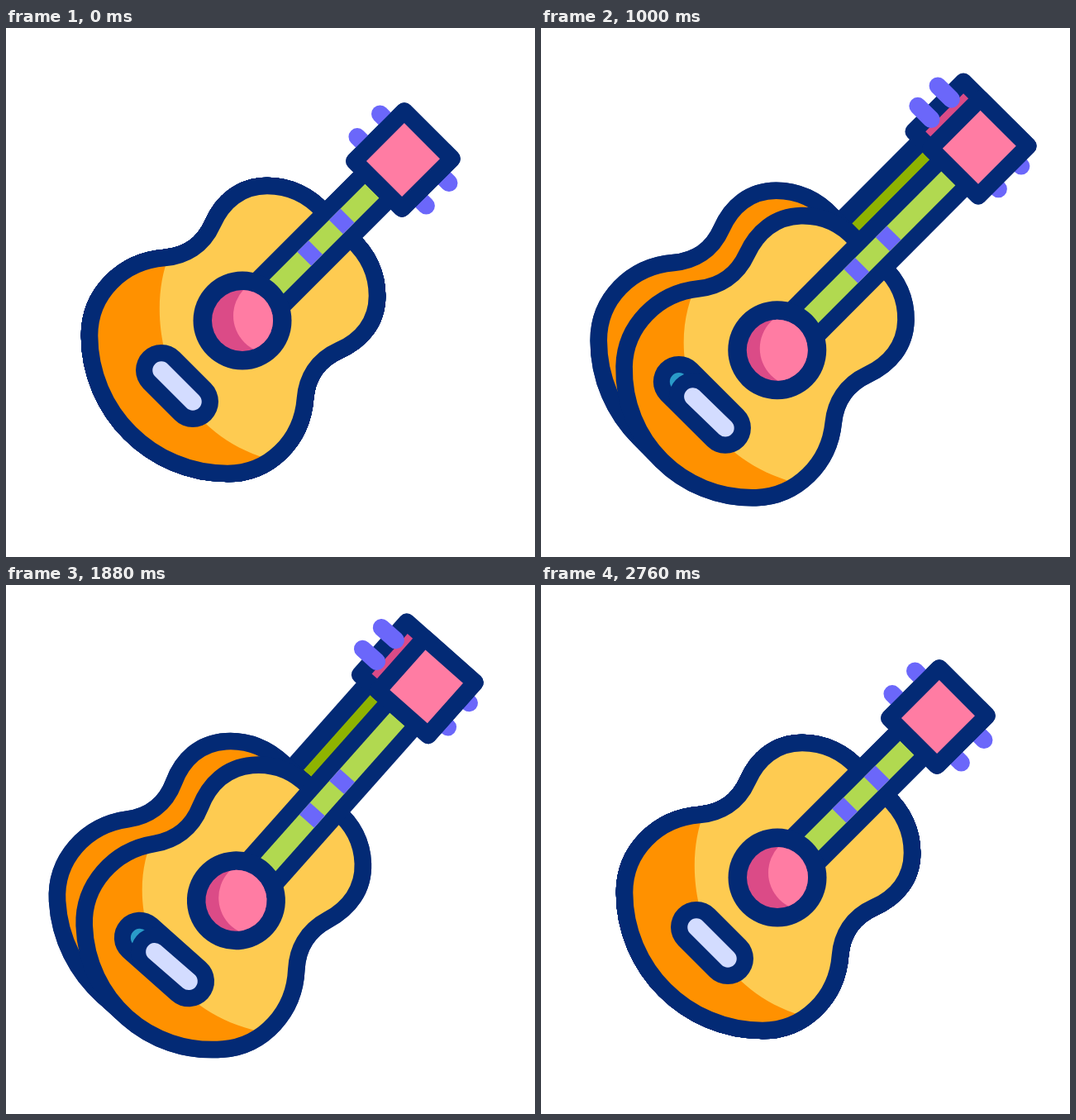
Write an HTML page with a canvas that moves like this. It is 640 by 640 pixels and loops after 3.1 s.

```html
<!DOCTYPE html>
<html lang="en">
<head>
<meta charset="utf-8">
<title>Guitar</title>
<style>
html, body { margin: 0; width: 100%; height: 100%; overflow: hidden; background: #fff; }
canvas { display: block; width: 640px; height: 640px; }
</style>
</head>
<body>
<canvas id="stage" width="640" height="640"></canvas>
<script>
const ctx = document.getElementById('stage').getContext('2d');
const LOOP = 3100, NAVY = '#032a75', PURPLE = '#6b67fa', STROKE = 20.6;
const BODY = new Path2D(`M384 222C366 202 342 191 316 191C284 191 262 210 250 237
  C238 264 216 276 192 278C140 282 101 322 101 372C101 464 176 539 268 539
  C318 539 358 500 362 448C364 424 376 402 403 390C430 378 449 356 449 324C449 298 438 274 418 256Z`);
const NOTE = new Path2D('M36 170Q67 168 67 138V86L135 66V115Q135 142 107 143');
// [time, degrees]
const SWING = [[422, 0], [647, 5], [862, -5], [1144, 5], [1364, -5], [1590, 5], [1820, -5], [2050, 5], [2280, 0]];

const clamp = x => Math.min(1, Math.max(0, x));
const mix = (a, b, k) => a + (b - a) * k;
const ramp = (t, a, b) => (1 - Math.cos(Math.PI * clamp((t - a) / (b - a)))) / 2;

function swingAt(t) {
  return SWING.slice(1).reduce((deg, [time, to], i) =>
    deg + (to - SWING[i][1]) * ramp(t, SWING[i][0], time), 0) * Math.PI / 180;
}

function box(color, x0, y0, x1, y1) {
  ctx.fillStyle = color;
  ctx.fillRect(x0, y0, x1 - x0, y1 - y0);
}

function disc(color, x, y, r) {
  ctx.fillStyle = color;
  ctx.beginPath();
  ctx.arc(x, y, r, 0, 7);
  ctx.fill();
}

function rod(color, width, x0, y0, x1, y1) {
  ctx.strokeStyle = color;
  ctx.lineWidth = width;
  ctx.beginPath();
  ctx.moveTo(x0, y0);
  ctx.lineTo(x1, y1);
  ctx.stroke();
}

function outline(path) {
  ctx.strokeStyle = NAVY;
  ctx.lineWidth = STROKE;
  ctx.stroke(path);
}

// Body moved by (dx, dy) and squeezed across the neck axis
function bodyAt(dx, dy, squeeze) {
  const path = new Path2D(), off = 507 * squeeze;
  path.addPath(BODY, new DOMMatrix([1 - squeeze, -squeeze, -squeeze, 1 - squeeze, dx + off, dy + off]));
  return path;
}

function plate(color, u, v0, v1) {
  const path = new Path2D();
  path.rect(u - 42.75, v0 - 40.75, 85.5, v1 - v0 + 81.5);
  ctx.fillStyle = color;
  ctx.fill(path);
  outline(path);
}

// Runs draw with x along the neck, origin at the sound hole
function alongNeck(depth, draw) {
  ctx.save();
  ctx.translate(286, 354 + 36 * depth);
  ctx.rotate(-Math.PI / 4);
  draw();
  ctx.restore();
}

function drawBody(depth) {
  for (let i = 0; i <= 8; i++) {
    const k = i / 8;
    const path = bodyAt(mix(-31, -1, k) * depth, mix(6, 36.5, k) * depth, 0.0235 * depth * k);
    ctx.fillStyle = NAVY;
    ctx.fill(path);
    outline(path);
  }
  const back = bodyAt(-31 * depth, 6 * depth, 0);
  ctx.fillStyle = '#ff9100';
  ctx.fill(back);
  outline(back);

  const front = bodyAt(-depth, 36.5 * depth, 0.0235 * depth);
  ctx.fill(front);
  ctx.save();
  ctx.clip(front);
  const dx = -18 * depth, dy = 29 * depth;
  ctx.fillStyle = '#fecb51';
  ctx.beginPath();
  ctx.moveTo(197 - 5 * depth, 276 + dy);
  ctx.bezierCurveTo(169 + dx, 345 + dy, 187 + dx, 489 + dy, 326 + dx / 2, 524 + dy);
  ctx.lineTo(640, 640);
  ctx.lineTo(640, 0);
  ctx.lineTo(197, 0);
  ctx.fill();
  ctx.restore();
  outline(front);
}

function drawBridge(depth) {
  const x0 = 188 - 4 * depth, y0 = 414 + 32 * depth, x1 = 226 - 3 * depth, y1 = 452 + 32 * depth;
  const bx = 188 - 21 * depth, by = 414 + 14 * depth;
  rod(NAVY, 62, bx, by, x1, y1);
  disc('#2a9bc8', bx, by, 11);
  rod(NAVY, 58, x0, y0, x1, y1);
  rod('#d3dcff', 21.5, x0, y0, x1, y1);
}

function drawHole(depth) {
  const y = 354 + 36 * depth;
  disc(NAVY, 286, y, 59.5);
  ctx.save();
  ctx.beginPath();
  ctx.arc(286, y, 37, 0, 7);
  ctx.clip();
  box('#db4b87', 240, y - 45, 330, y + 45);
  disc('#ff7ca3', 321 - 10 * depth, y - 6 + 4 * depth, 46);
  ctx.restore();
}

function drawGuitar(t) {
  const close = 1 - ramp(t, 2285, 2750);
  const depth = ramp(t, 10, 400) * close;
  const head = 275 + 71.5 * ramp(t, 10, 440) * close;
  const slide = t > 420 && t < 2280 ? 12 * (1 - Math.cos((t - 420) / 930 * 2 * Math.PI)) : 0;

  ctx.save();
  ctx.translate(143, 515);
  ctx.rotate(swingAt(t));
  ctx.translate(-143, -515);

  alongNeck(depth, () => {
    box(NAVY, 120, -32 - 34.5 * depth, head - 40, 0);
    box('#8fb300', 165, -12 - 32 * depth, head - 50, 0);
  });
  drawBody(depth);
  drawBridge(depth);

  alongNeck(depth, () => {
    box(NAVY, 30, -32, head - 40, 32);
    box('#b1d950', 50, -12, head - 50, 12);
    for (const u of [115.5, 170]) box(PURPLE, u + slide - 9.7, -12, u + slide + 9.7, 12);

    const lift = 29 * depth;
    for (const u of [-19.5, 19.5]) rod(PURPLE, 21, head + u, 20, head + u, 59 - 7 * depth);
    plate(NAVY, head, -lift, 0);
    box('#db4b87', head - 32.5, -30.5 - lift, head + 32.5, 0);
    const gap = 19.5 - 2.3 * depth;
    for (const u of [-gap, gap]) rod(PURPLE, 21, head + u, -59 - lift, head + u, -36 - lift);
    plate('#ff7ca3', head, 0, 0);
  });
  drawHole(depth);
  ctx.restore();
}

// A note rises, slowing down, until its end time
function drawNote(t, end, dx, dy, fade) {
  const left = end - t;
  if (left <= 0 || left > 460) return;
  ctx.save();
  ctx.globalAlpha = clamp((460 - left) / 50) * clamp(fade(left));
  ctx.translate(dx, dy + 175 * (left / 460) ** 2);
  ctx.strokeStyle = '#ffd05b';
  ctx.lineWidth = 21;
  ctx.stroke(NOTE);
  ctx.restore();
}

function frame(now) {
  const t = now % LOOP;
  ctx.fillStyle = '#fff';
  ctx.fillRect(0, 0, 640, 640);
  ctx.lineCap = ctx.lineJoin = 'round';
  drawGuitar(t);
  for (const end of [971, 1865]) drawNote(t, end, 0, -44, left => left / 245);
  for (const end of [1486, 2380]) drawNote(t, end, 437, 263, left => (left - 90) / 255);
}

const start = performance.now();
function tick() {
  frame(performance.now() - start);
  requestAnimationFrame(tick);
}
tick();
</script>
</body>
</html>
```
